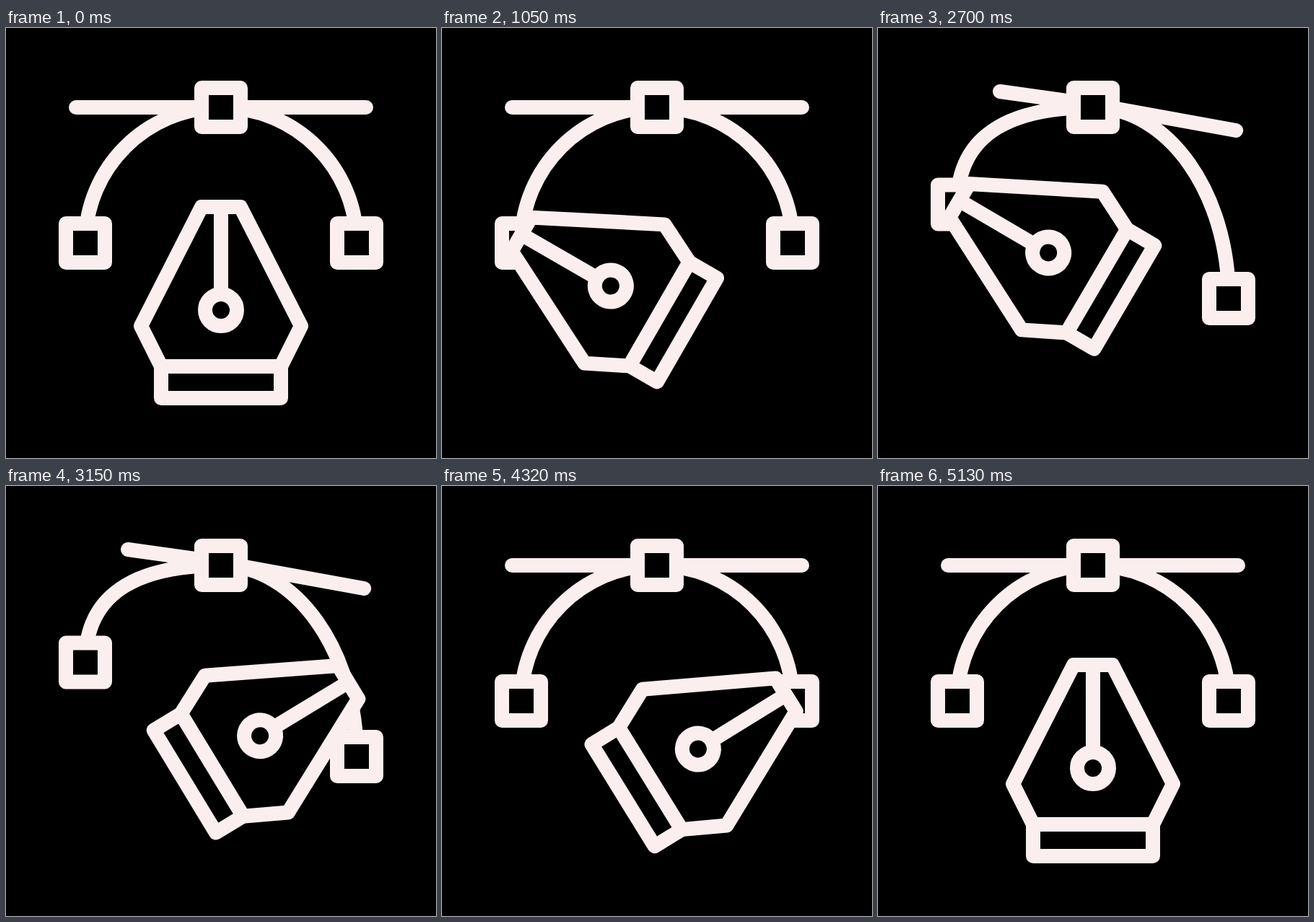
An HTML page that plays this animation: 596 px wide and 596 px high, repeating every 5400 ms.

```html
<!DOCTYPE html>
<html lang="en">
<head>
<meta charset="utf-8">
<title>Pen tool</title>
<style>
  html, body { margin: 0; width: 100%; height: 100%; overflow: hidden; background: #000; }
  svg { display: block; width: 100%; height: 100%; }
  .ink { fill: #000; stroke: #fbeeee; stroke-width: 20; stroke-linejoin: round; }
  .open { fill: none; }
</style>
</head>
<body>
<svg viewBox="0 0 596 596">
  <g class="ink">
    <path id="handle" class="open" stroke-linecap="round"/>
    <path id="curve" class="open"/>
    <rect id="left" x="83" width="54" height="54"/>
    <rect x="271" y="83" width="54" height="54"/>
    <rect id="right" x="459" width="54" height="54"/>
    <!-- origin: middle of the pen's base -->
    <g id="pen">
      <path d="M-83-44L-111-100L-27-265H27L111-100L83-44Z"/>
      <rect x="-83" y="-44" width="166" height="44"/>
      <path d="M0-265V-142"/>
      <circle cy="-122" r="22"/>
    </g>
  </g>
</svg>
<script>
const LOOP = 5400, STEP = 30;
const TOP = 110, RADIUS = 188, K = 0.5523;
const $ = id => document.getElementById(id);
const [handle, curve, left, right, pen] = ['handle', 'curve', 'left', 'right', 'pen'].map($);

// Pen poses: base x, base y, angle
const REST = [298, 513, 0];
const GRAB_LEFT = [339.5, 418.5, -60];
const PULL_LEFT = [341.7, 373, -60];
const GRAB_RIGHT = [229.3, 416.8, 82.2];
const PULL_RIGHT = [251, 428.5, 58.4];

// Moves: start, end, pen pose reached, bend of the curve reached
const MOVES = [
  [0, 1050, GRAB_LEFT, 0],
  [1320, 2220, PULL_LEFT, 1],
  [2657, 3383, GRAB_RIGHT, 1],
  [3383, 3990, PULL_RIGHT, 0],
  [4275, 5125, REST, 0]
];

const lerp = (a, b, p) => a + (b - a) * p;

function ease(t) {
  t = Math.min(1, Math.max(0, t));
  const half = u => Math.pow(2 * u, 2.5) / 2;
  return t < 0.5 ? half(t) : 1 - half(1 - t);
}

function stateAt(time) {
  let pose = REST, bend = 0;
  for (const [start, end, nextPose, nextBend] of MOVES) {
    if (time < start) break;
    const p = ease((time - start) / (end - start));
    pose = pose.map((v, i) => lerp(v, nextPose[i], p));
    bend = lerp(bend, nextBend, p);
  }
  return { pose, bend };
}

// Control point above a lower anchor; its arm never gets shorter than at rest
const armTop = y => y - K * Math.max(RADIUS, y - TOP);

function draw(time) {
  const { pose: [x, y, angle], bend } = stateAt(time);
  const bent = (a, b) => lerp(a, b, bend);
  const leftY = bent(298, 244.5), rightY = bent(298, 375);
  const arm = K * RADIUS;

  handle.setAttribute('d',
    `M${bent(97, 169)} ${bent(TOP, 88)}` +
    `L298 ${bent(TOP, 106)}` +
    `L${bent(499, 496.2)} ${bent(TOP, 142)}`);
  curve.setAttribute('d',
    `M110 ${leftY}C110 ${armTop(leftY)} ${298 - arm} ${TOP} 298 ${TOP}` +
    `C${298 + arm} ${TOP} 486 ${armTop(rightY)} 486 ${rightY}`);
  left.setAttribute('y', leftY - 27);
  right.setAttribute('y', rightY - 27);
  pen.setAttribute('transform', `translate(${x} ${y}) rotate(${angle})`);
}

const begin = performance.now();
function tick() {
  const time = (performance.now() - begin) % LOOP;
  draw(Math.floor(time / STEP) * STEP);
  requestAnimationFrame(tick);
}
tick();
</script>
</body>
</html>
```
